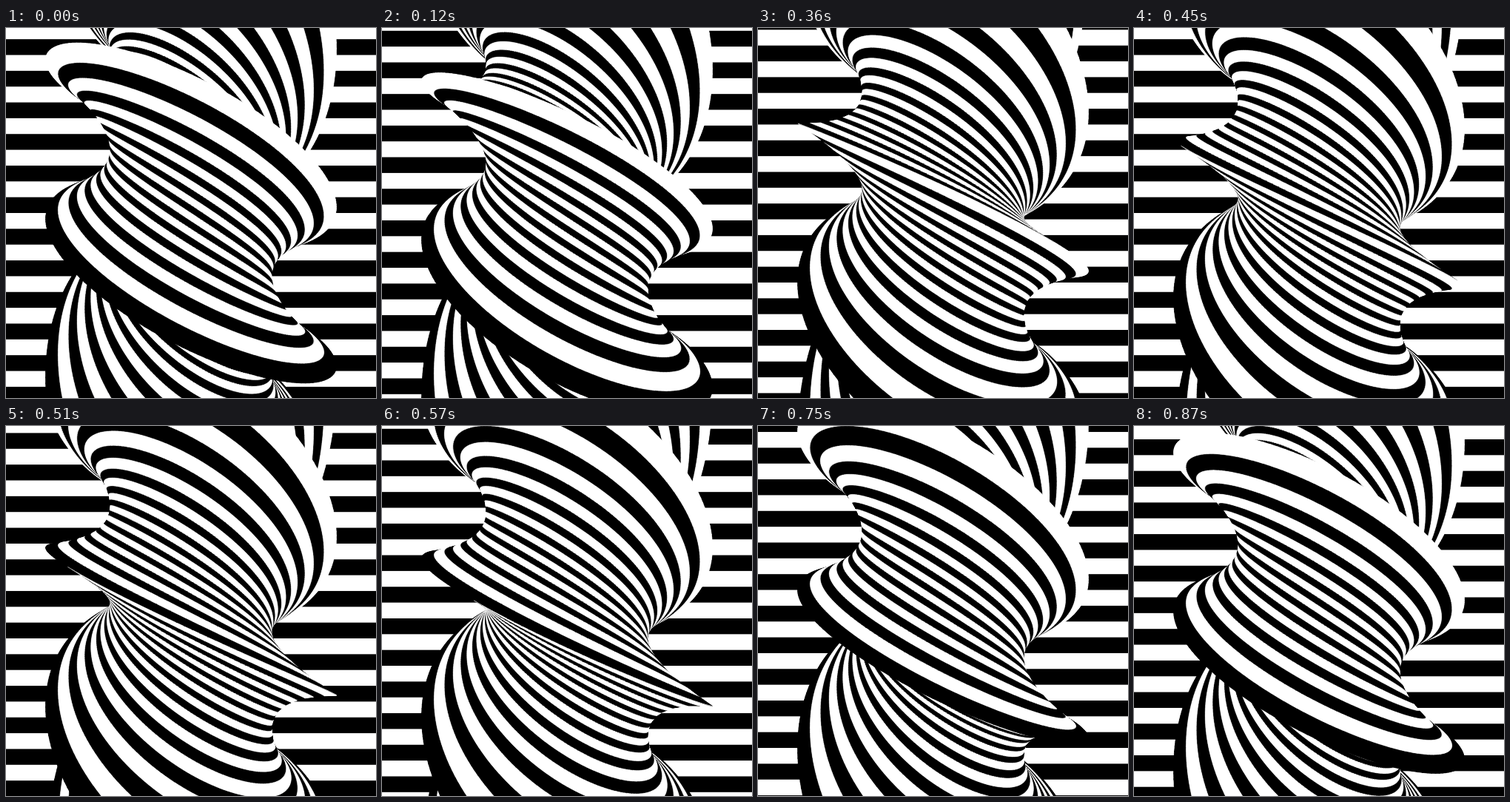
Write an HTML page with a canvas that moves like this. It is 500 px wide and 500 px high and loops after 0.9 s.

```html
<!DOCTYPE html>
<html lang="en">
<head>
<meta charset="utf-8">
<title>Twisted column</title>
<style>
  html, body { margin: 0; width: 100%; height: 100%; overflow: hidden; background: #fff; }
  canvas { display: block; width: 500px; height: 500px; }
</style>
</head>
<body>
<canvas id="stage" width="500" height="500"></canvas>
<script>
const ctx = document.getElementById('stage').getContext('2d');
const LOOP = 900, STEP = 30;
const EYE = 176;               // camera distance from the axis
const HALF = 92.7;             // half a side of the square column
const PITCH = 95.5;            // height between neighbouring corner lines
const TURN = PITCH * 4;
const BANDS = 24;              // black and white bands per side
const REACH = 290, ROW = 1.25, LAP = 1.5;
const BAR = 42.7;

// Band edges around the square, evenly spaced on each side.
const edges = Array.from({ length: BANDS * 4 + 1 }, (_, j) => {
  const side = Math.floor(j / BANDS);
  const x = 2 * (j % BANDS) / BANDS - 1;
  return {
    r: HALF * Math.hypot(1, x),
    angle: side * Math.PI / 2 + Math.PI / 4 + Math.atan(x)
  };
});

// Screen points of the band edges at one height of the column.
function ring(y, shift) {
  const twist = 2 * Math.PI * (y - shift) / TURN;
  return edges.map(({ r, angle }) => {
    const a = twist - angle;
    const s = EYE / (EYE - r * Math.cos(a));
    return [250 + s * r * Math.sin(a), 250 + s * y];
  });
}

function paint(path, color) {
  ctx.fillStyle = ctx.strokeStyle = color;
  ctx.fill(path);
  ctx.stroke(path);
}

function drawRow(y0, y1, shift) {
  const top = ring(y0, shift), low = ring(y1, shift);
  const white = new Path2D(), black = new Path2D();
  for (let j = 0; j < edges.length - 1; j++) {
    const a = top[j], b = top[j + 1], c = low[j + 1], d = low[j];
    const facing = (c[0] - a[0]) * (d[1] - b[1]) - (c[1] - a[1]) * (d[0] - b[0]);
    if (facing >= 0 || Math.abs(a[1] - 250) > 290) continue;
    const p = j % 2 ? black : white;
    p.moveTo(a[0], a[1]);
    p.lineTo(b[0], b[1]);
    p.lineTo(c[0], c[1]);
    p.lineTo(d[0], d[1]);
    p.closePath();
  }
  paint(black, '#000');
  paint(white, '#fff');
}

function draw(t) {
  const u = t / LOOP;
  ctx.fillStyle = '#fff';
  ctx.fillRect(0, 0, 500, 500);
  ctx.fillStyle = '#000';
  const first = 250 - (5.5 + 2 * u) * BAR;
  for (let y = first; y < 500; y += BAR) ctx.fillRect(0, y, 500, BAR / 2);

  // Rows nearer to eye level cover those further away.
  ctx.lineWidth = 0.4;
  ctx.lineJoin = 'bevel';
  const shift = (u - 0.5) * PITCH;
  for (let y = REACH; y > 0; y -= ROW) {
    drawRow(-y - LAP, -y + ROW, shift);
    drawRow(y - ROW, y + LAP, shift);
  }
}

let shown = -1;
function tick() {
  const t = Math.floor(performance.now() % LOOP / STEP) * STEP;
  if (t !== shown) draw(shown = t);
  requestAnimationFrame(tick);
}
tick();
</script>
</body>
</html>
```
